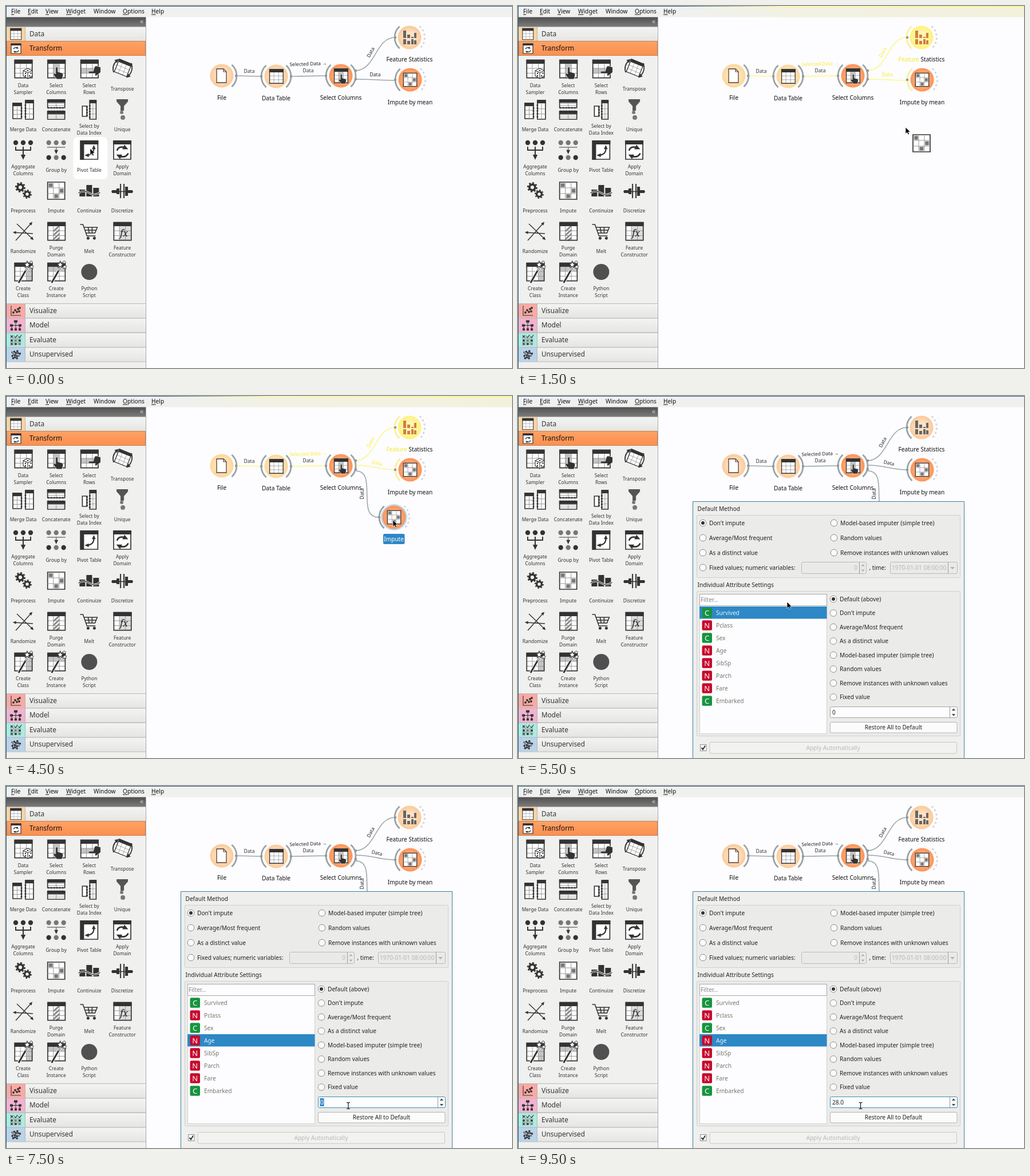
An HTML page that plays this animation: 884x633 px, repeating every 10000 ms.

```html
<!DOCTYPE html>
<html lang="en">
<head>
<meta charset="utf-8">
<title>Imputing a value</title>
<style>
html, body { margin: 0; width: 100%; height: 100%; overflow: hidden; background: #fdfcfe; }
svg { display: block; --link: #9ba8a8; --lab: #222; --peach: #fde3c6; --rim: #fbc896; --bar: #666; --arc: #98a3a6; --name: #111; --cream: #fde3c6; --creamrim: #fcca98; }
svg.warm { --link: #fcf88c; --lab: #f6ee30; --peach: #fff5b4; --rim: #fff27c; --bar: #d0803f; --arc: #f6f29c; --name: #f2ea30; --cream: #fdeabc; --creamrim: #fdd69a; }
text { font-family: "Noto Sans", "Open Sans", sans-serif; white-space: pre; }
.u { text-decoration: underline; }
.d { fill: #333; }
.g { fill: #777; }
.w { fill: #fff; }
.s { fill: none; stroke: #333; stroke-width: 1.7; }
.b { fill: #fff; stroke: #333; stroke-width: 1.7; }
.t { fill: none; stroke: #999; stroke-width: 1; }
.link { fill: none; stroke: #9ba8a8; stroke-width: 1.6; }
</style>
</head>
<body>
<svg id="stage" width="884" height="633" viewBox="0 0 884 633">
<defs>
<linearGradient id="bar" x2="0" y2="1"><stop stop-color="#f4f4f3"/><stop offset="1" stop-color="#e5e5e4"/></linearGradient>
<linearGradient id="hot" x2="0" y2="1"><stop stop-color="#ffa266"/><stop offset="1" stop-color="#fb8f4d"/></linearGradient>
<linearGradient id="dark" x2="0" y2="1"><stop stop-color="#505050"/><stop offset="1" stop-color="#7d7d7d"/></linearGradient>
<linearGradient id="glow"><stop stop-color="#fffbb0" stop-opacity="0"/><stop offset=".3" stop-color="#fffb9c"/><stop offset="1" stop-color="#fff96e"/></linearGradient>
<radialGradient id="peach"><stop offset=".4" stop-color="var(--peach)"/><stop offset="1" stop-color="var(--rim)"/></radialGradient>
<radialGradient id="cream"><stop offset=".4" stop-color="var(--cream)"/><stop offset="1" stop-color="var(--creamrim)"/></radialGradient>
<radialGradient id="orange"><stop offset=".35" stop-color="#ffb88f"/><stop offset="1" stop-color="#fd9254"/></radialGradient>
</defs>
</svg>
<script>
const stage = document.getElementById('stage');
const at = (x, y, body, more = '') => `<g transform="translate(${x} ${y}) ${more}">${body}</g>`;
const path = (cls, d, more = '') => `<path class="${cls}" d="${d}" ${more}/>`;
const dot = (x, y, r, cls = 'd') => `<circle class="${cls}" cx="${x}" cy="${y}" r="${r}"/>`;
const rect = (x, y, w, h, fill, more = '') =>
  `<rect x="${x}" y="${y}" width="${w}" height="${h}" fill="${fill}" ${more}/>`;
// y is the middle of the line of text
const text = (x, y, s, size = 10.14, fill = '#222', more = '') =>
  `<text x="${x}" y="${y + size * .36}" font-size="${size}" fill="${fill}" ${more}>${s}</text>`;
const mid = 'text-anchor="middle"';

/* ---------- icons, centred on 0,0 ---------- */
const table = (inner = '') => path('w', 'M-15-16H16V16H-15z') + inner +
  path('t', 'M-15-1H16M-15 7.5H16M-5-9V16M5.5-9V16') +
  path('s', 'M-14.7-15.5H15.7V15.7H-14.7z') + path('d', 'M-15.5-16.3H16.5V-9H-15.5z');
const hand = (x, y, turn = 0) =>
  at(x, y, path('d', 'M-4-9q2-3 4 0v7l7 2q3 1 2 5l-2 6h-9l-6-8q0-3 3-2l1 1z', 'stroke="#fff" stroke-width=".7"'), `rotate(${turn})`);
const head = (x, y, turn, k = 1) => at(x, y, path('d', 'M5 0L-4-4.2V4.2z'), `rotate(${turn}) scale(${k})`);
const grid = path('b', 'M-15-15H15V15H-15z') +
  path('t', 'M-5-15V15M5-15V15M-15-5H15M-15 5H15') +
  path('g', 'M-13-13H-6V-6H-13zM6-3.5H13V3.5H6zM-3.5 6H3.5V13H-3.5z', 'stroke="#bbb"');
const swap = path('s', 'M-8-1Q-6-8 3-6M9 3Q6 10-3 8', 'style="stroke-width:2.4"') + head(5, -5, 25, .9) + head(-5, 7, 205, .9);
const gear = (x, y, r) => at(x, y,
  `<circle class="s" r="${r}" style="stroke-width:${r * .75}"/>` +
  `<circle class="s" r="${r * 1.55}" pathLength="16" stroke-dasharray="1 1" style="stroke-width:${r * .5}"/>`);
const star = (x, y, k) => at(x, y, path('b', 'M0-6L1.7-2 6-1.6 2.8 1.3 3.8 5.6 0 3.3-3.8 5.6-2.8 1.3-6-1.6-1.7-2z', 'style="stroke-width:1.3"'), `scale(${k})`);
const wand = path('s', 'M-8 19L7-7', 'style="stroke:#fff;stroke-width:5"') +
  path('s', 'M-8 19L7-7', 'style="stroke-width:3"') + path('s', 'M4-2L7-7', 'style="stroke:#fff;stroke-width:1.4"') +
  star(7, -13, .95) + star(15, -9, .6) + star(14, -17, .5);
const sheet = (x, y, w, h) => path('b', `M${x} ${y}h${w}v${h}h${-w}z`) + path('d', `M${x - .8} ${y - .8}h${w + 1.6}v6h${-w - 1.6}z`) +
  path('t', `M${x + w / 2} ${y + 6}v${h - 7}M${x + 1} ${y + h * .45}h${w - 2}M${x + 1} ${y + h * .72}h${w - 2}`);
const dashes = d => path('s', d, 'stroke-dasharray="3 2" style="stroke-width:2.6"');
const trio = (y, ...cls) => cls.map((c, i) => dot(-13 + 13 * i, y, 4.2, c)).join('');
const bars = '<path fill="var(--bar)" d="M-11-12h5V1h-5zM-4-5h5v6h-5zM3-1h4v2h-4zM8-8h4v9h-4zM-11 3h5v9h-5zM-4 6h5v6h-5zM3 3h4v9h-4zM8 5h4v7h-4z"/>';
const page = path('b', 'M-9-12H3L8-7V12H-9z', 'style="stroke:#5a3a34;stroke-width:1.3"') + path('s', 'M3-12V-7H8', 'style="stroke:#5a3a34;stroke-width:1.2"');

const die = path('b', 'M8-1L16 3V12L8 17 0 12V3zM0 3L8 7 16 3M8 7V17', 'style="stroke-width:1.1"') +
  dot(8, 3, 1.3) + dot(4, 8, 1.2) + dot(4, 12, 1.2) + dot(11, 12, 1.2) + dot(13.5, 7.5, 1.2);
const column = path('', 'M-5-9H5V16H-5z', 'fill="#c4c4c4"');
const tools = [
  ['Data|Sampler', table() + die],
  ['Select|Columns', table(column) + hand(3, 7)],
  ['Select|Rows', table(path('', 'M-15-1H16V7H-15z', 'fill="#c4c4c4"')) + hand(9, 4, -90)],
  ['Transpose', at(1, -2, table(), 'rotate(22) scale(.76)') +
    path('s', 'M-15 6Q-19-6-9-15M16-10Q20 3 11 12', 'style="stroke-width:1.8"') + head(-9, -15, -40, .8) + head(10, 13, 140, .8)],
  ['Merge Data', sheet(-18, -11, 15, 27) + sheet(4, -16, 14, 33) + dashes('M-3-4V16M4-9V16')],
  ['Concatenate', sheet(-15, -17, 30, 14) + sheet(-15, 3, 30, 14) + dashes('M-15-3H15M-15 3H15')],
  ['Select by|Data Index', sheet(1, -16, 11, 33) + path('b', 'M-12-6H-4V12H-12z') + dashes('M-4-6V12M1-8V15')],
  ['Unique', path('', 'M-10-18H10V-14L3-6V2H-3V-6L-10-14z', 'fill="#555"') + dot(-1, 5, 3, 'g') + dot(1, 14, 4, 'g')],
  ['Aggregate|Columns', trio(-13, 'd', 'd', 'd') + path('s', 'M-13-6V0H13V-6M0-6V12', 'style="stroke-width:2"') + head(0, 12, 90)],
  ['Group by', trio(-13, 'g', 'g', 'g') + path('s', 'M-16-5H16M0-5V2', 'style="stroke:#777;stroke-width:1.5"') + head(0, 3, 90, .8) + trio(13, 'd', 'g', 'd')],
  ['Pivot Table', path('b', 'M-15-16H15V16H-15z') + path('d', 'M-16-17H16V-10H-16zM-16-10H-9V17H-16z') +
    path('s', 'M-4 9Q9 8 8-4', 'style="stroke-width:2.2"') + head(8, -5, -90, .8) + head(-4, 9, 180, .8)],
  ['Apply|Domain', path('b', 'M-15-16H15V16H-15z') + path('d', 'M-16-17H16V-10H-16z') + at(0, 2, swap, 'scale(1.15)')],
  ['Preprocess', gear(-5, -6, 5) + gear(7, 6, 4.4)],
  ['Impute', grid],
  ['Continuize', path('d', 'M-17-2H-7V10H-17zM-5-10H5V10H-5zM7-5H17V10H7z') +
    path('s', 'M-19 4Q-9-2 0 4T19 3', 'style="stroke:#fff;stroke-width:3"') + path('s', 'M-19 4Q-9-2 0 4T19 3', 'style="stroke-width:1.4"')],
  ['Discretize', path('d', 'M-18-1H-10V4H-18zM-10-4H-5V6H-10zM5-7H10V9H5zM10-1H18V4H10z') +
    path('s', 'M-3-12V13M3-12V13', 'style="stroke-width:2"') + path('s', 'M-19 1.5H19')],
  ['Randomize', path('s', 'M-13 16L13-13M-11-13L16 13M17 4L-16 2', 'style="stroke-width:1.4"') +
    head(14, -14, -48, .65) + head(16, 13, 43, .65) + head(-15, 2, 183, .65)],
  ['Purge|Domain', table(path('w', 'M-5-9H6V16H-5z') + path('s', 'M-5 0L5-9M-5 7L6-3M-5 14L6 4M0 16L6 11', 'style="stroke:#888;stroke-width:3"'))],
  ['Melt', path('s', 'M-16-12H-11L-4 8H11M-9-7H14L10 3H-6M-7-2H12M-2-7L0 3M5-7V3', 'style="stroke-width:1.6"') + dot(-2, 12, 2.5) + dot(9, 12, 2.5)],
  ['Feature|Constructor', table(path('', 'M-5-9H16V16H-5z', 'fill="#ddd"')) +
    `<text x="3" y="9" font-size="16" ${mid} fill="#222" style="font-family:'Noto Serif',serif;font-style:italic">fx</text>`],
  ['Create|Class', table(path('', 'M6-9H16V16H6z', 'fill="#c4c4c4"')) + wand],
  ['Create|Instance', table(path('', 'M-15-9H16V-1H-15z', 'fill="#c4c4c4"')) + wand],
  ['Python|Script', '<circle r="14" fill="#505050"/>'],
];
const cellX = i => 30 + 57.7 * (i % 4);
const cellY = i => 110 + 71 * Math.floor(i / 4);

/* ---------- side panel ---------- */
function tool([label, icon], i) {
  const x = cellX(i), y = cellY(i), lines = label.split('|');
  return at(x, y, icon) + lines.map((s, k) =>
    text(x, y + (lines.length > 1 ? 28.5 + 12 * k : 34.5), s, 8.45, '#333', mid)).join('');
}
function section(y, label, tint, icon) {
  return rect(1, y, 243, 25, 'url(#bar)') + rect(1, y, 32, 25, tint) +
    path('', `M1 ${y + .5}H244M1 ${y + 25.5}H244M33.5 ${y}V${y + 25}`, 'stroke="#b6b6b6"') +
    at(17, y + 13, icon) + text(41, y + 12.7, label, 11.75, '#333');
}
const scatter = path('s', 'M-8-9V8H9', 'style="stroke-width:1.1"') +
  [[-4, 3], [-1, -1], [2, 2], [4, -3], [7, -5], [6, 1]].map(p => dot(...p, 1.9)).join('');
const tree = path('s', 'M0-6V0M-7 5V0H7V5M0 0V5', 'style="stroke-width:1"') +
  path('d', 'M-3-9H3V-5H-3zM-10-2H-5V2H-10zM5-2H10V2H5zM-9 5H-5V9H-9zM-2 5H2V9H-2zM5 5H9V9H5z');
const score = path('s', 'M-9-8l4 4m0-4l-4 4M-2-6l2 2 3-5M5-6l2 2 3-5M-9 5l4 4m0-4l-4 4', 'style="stroke-width:1.2"') +
  path('t', 'M-10-2H10M-10 4H10M-3-9V9M4-9V9') + dot(-7, 1, 2) + dot(0, 1, 2, 'g') + dot(7, 1, 2) + dot(0, 7, 2) + dot(7, 7, 2, 'g');
const cluster = [...Array(15)].map((_, i) => {
  const r = 2.1 * Math.sqrt(i), a = i * 2.4;
  return dot((r * Math.cos(a)).toFixed(1), (r * Math.sin(a)).toFixed(1), 1.8, i % 4 ? 'd' : 'g');
}).join('');

const menus = [[9, 'File', 1], [38, 'Edit', 1], [69, 'View', 1], [105, 'Widget', 1], [153, 'Window', 0], [204, 'Options', 1], [254, 'Help', 1]]
  .map(([x, s, n]) => text(x, 9.8, n ? `<tspan class="u">${s[0]}</tspan>${s.slice(1)}` : s, 10.2, '#111')).join('');

const chrome = rect(0, 0, 884, 633, '#fdfcfe') + rect(0, 0, 884, 19.5, '#f0f0ef') +
  rect(0, 0, 884, 1, '#2a6288') +
  `<g id="glow-top">${rect(280, 1, 604, 18.5, 'url(#glow)', 'opacity=".14"')}${rect(280, 0, 604, 1.5, 'url(#glow)')}</g>` + menus +
  rect(1, 19.5, 243, 613.5, '#f0f0ef') + rect(1, 19.5, 243, 17, 'url(#dark)') + text(237, 26.5, '«', 13, '#ccc', mid) +
  section(36, 'Data', '#fbd3a2', at(0, 0, table(), 'scale(.62)')) +
  rect(1.5, 61.5, 242, 25, 'url(#hot)', 'stroke="#c58258"') +
  path('b', 'M9 66H26V83H9z', 'style="stroke-width:1.2"') + path('d', 'M8.5 65.5H26.5V69H8.5z') + at(17.5, 76, swap, 'scale(.52)') +
  text(41, 74, 'Transform', 11.75, '#111') +
  '<rect id="hover" width="60" height="74" rx="8" fill="#fff"/>' + tools.map(tool).join('') +
  section(520, 'Visualize', '#f9aaa4', scatter) + section(545.5, 'Model', '#f3b2cf', tree) +
  section(571, 'Evaluate', '#abebdf', score) + section(596.5, 'Unsupervised', '#b9d3ea', cluster) +
  rect(0, 0, 1, 633, '#2a6288') + rect(244, 19.5, 1, 613.5, '#a9a9a9');

/* ---------- workflow ---------- */
function arc(side, r, more) {
  const x = side * r * .67, y = r * .74;
  return `<path d="M${x} ${-y}A${r} ${r} 0 0 ${side > 0 ? 1 : 0} ${x} ${y}" fill="none" stroke-width="2.8" ${more}/>`;
}
function node(x, y, fill, icon, label, ports, tone = '#98a3a6', dy = 38.5) {
  const solid = `stroke="${tone}"`;
  return at(x, y,
    (ports[0] === '1' ? arc(-1, 26, solid) : '') +
    (ports[1] === '1' ? arc(1, 26, solid) : arc(1, 26.5, 'stroke="#d3d7da" stroke-dasharray="3.5 4"')) +
    `<circle r="20.5" fill="url(#${fill})"/>` + icon + text(0, dy, label, 10.14, '#111', mid));
}
const small = s => at(0, 0, s, 'scale(.78)');
const label = (x, y, turn, s = 'Data', fill = 'var(--lab)') =>
  at(x, y, text(0, 0, s, 8.5, fill, mid), `rotate(${turn})`);
const wire = (d, more = '') => path('link', d, more);
const warm = 'style="stroke:var(--link)"';
const port = (x, y) => `<circle cx="${x}" cy="${y}" r="2.2" fill="#8d989b"/>`;

const flow = wire('M402 122L446 123', warm) + wire('M498 123L559 122', warm) + wire('M611 113C646 112 645 55 680 55', warm) +
  `<g id="flat">${wire('M611 128C634 128 657 130 680 130', warm)}${label(645, 120, 0)}</g>` +
  `<g id="bent">${wire('M611 121C642 121 650 129 680 129', warm)}${label(648, 117, 12)}</g>` +
  `<path id="cord" class="link"/>` +
  label(425, 113.5, 0, 'Data', '#333') + label(528, 101, -2, 'Selected Data →') + label(528, 113, 0, 'Data', '#333') + label(637, 81, -62) +
  node(377, 122, 'cream', page, 'File', '01') +
  node(472, 123, 'cream', small(table()), 'Data Table', '11') +
  node(585, 122, 'orange', small(table(column) + hand(3, 7)), 'Select Columns', '11', '#98a3a6', 38) +
  node(705, 55, 'peach', bars, '<tspan fill="var(--name)">Feature</tspan> Statistics', '1.', 'var(--arc)') +
  node(706, 129, 'orange', small(grid), 'Impute by mean', '1.', 'var(--arc)', 39) +
  [[402, 122], [446, 123], [498, 123], [559, 122], [611, 113], [611, 128], [680, 55], [680, 129]].map(p => port(...p)).join('') +
  '<g id="added"><circle id="halo" cx="678" cy="212" r="23" fill="#bcdcf3"/>' +
  node(678, 212, 'orange', small(grid), '', '1.') + port(652, 212) +
  '<rect id="chip" x="659" y="241" width="37.5" height="18" rx="2.5" fill="#2f86c6"/>' +
  text(677.5, 250, 'Impute', 10.14, '#111', mid + ' id="name"') + '</g>' +
  `<g id="cord-label">${label(621.5, 171, -90, 'Data', '#222')}</g>`;

/* ---------- dialog ---------- */
const edge = c => `stroke="${c}" rx="2"`;
function radio(x, y, s, on) {
  return `<circle cx="${x}" cy="${y}" r="5.8" fill="#fbfbfb" stroke="#8d9091"/>` +
    (on ? dot(x, y, 3) : '') + text(x + 11, y, s);
}
function arrows(x, y, fill) {
  return at(x, y, `<path fill="${fill}" d="M-3.2-3L0-6.4 3.2-3zM-3.2 3L0 6.4 3.2 3z"/>`);
}
const methods = ["Don't impute", 'Average/Most frequent', 'As a distinct value', 'Model-based imputer (simple tree)', 'Random values', 'Remove instances with unknown values'];
const fields = [['Survived', 1], ['Pclass'], ['Sex', 1], ['Age'], ['SibSp'], ['Parch'], ['Fare'], ['Embarked', 1]];
const field = ([s, cat], i) => {
  const y = 379 + 22 * i;
  return rect(321.5, y - 8.7, 17.5, 17.5, cat ? '#16943f' : '#c70a2c', 'rx="2.5"') +
    text(330.2, y, cat ? 'C' : 'N', 13, '#fff', mid) + text(346, y, s, 10.14, '#77786f', 'class="field"');
};
const dialog = '<g id="dialog">' + rect(305, 184, 475, 460, '#efefee') +
  path('', 'M305.5 633V184.5H779.5V633', 'fill="none" stroke="#3d7f9f"') +
  text(313.5, 197.5, 'Default Method') + rect(312.5, 208.5, 460, 109, '#ebebea', edge('#cfcfce')) +
  methods.map((s, i) => radio(i < 3 ? 323 : 552, 222 + 26 * (i % 3), s, !i)).join('') +
  radio(323, 300, 'Fixed values; numeric variables:') +
  rect(495.5, 290.5, 113, 20, '#eaeae9', edge('#b9b9b8')) + path('t', 'M596.5 291V310') + arrows(602.5, 300.5, '#b0b0b0') +
  text(593, 300.5, '0', 10.14, '#b8b8b8', 'text-anchor="end"') + text(613.5, 300, ', time:') +
  rect(650.5, 290.5, 117, 20, '#eaeae9', edge('#b9b9b8')) + text(653, 300.5, '1970-01-01 08:00:00', 10.14, '#b8b8b8') +
  path('t', 'M751.5 291V310') + path('', 'M755 299H763L759 303z', 'fill="#b0b0b0"') +
  text(313.5, 330.5, 'Individual Attribute Settings') + rect(312.5, 341.5, 460, 253, '#ebebea', edge('#cfcfce')) +
  rect(317.5, 366.5, 222, 224, '#fdfcfe', 'stroke="#d0d0cf"') + rect(317.5, 346.5, 222, 20, '#fdfcfe', 'stroke="#a9a9a9"') +
  text(319, 356, 'Filter...', 10.14, '#888') + '<rect id="row" x="317" width="222.5" height="21.5" fill="#2d88c5"/>' +
  fields.map(field).join('') +
  ['Default (above)', ...methods, 'Fixed value'].map((s, i) => radio(551, 355 + 24.5 * i, s, !i)).join('') +
  rect(545.5, 543.5, 222, 19, '#fdfcfe', edge('#a3a3a3') + ' id="spin"') + path('t', 'M754.5 544V562') + arrows(761, 553, '#444') +
  '<rect id="pick" x="548.5" y="546" width="7" height="14" fill="#2d88c5"/>' + text(549, 553, '', 10.14, '#222', 'id="value"') +
  '<rect id="caret" y="546" width="1" height="14" fill="#111"/>' +
  rect(545.5, 570.5, 221.5, 18.5, '#fbfbfb', edge('#b3b3b3')) + text(656, 579.5, 'Restore All to Default', 10.14, '#222', mid) +
  rect(318.5, 609.5, 10.5, 11, '#fdfdfd', 'stroke="#8d9091"') + path('s', 'M320.5 615L323 618 327 611.5', 'style="stroke-width:2"') +
  rect(335, 605.5, 431.5, 19.5, '#f2f2f1', edge('#c6c6c5')) + text(550.5, 615, 'Apply Automatically', 10.14, '#b9b9b9', mid) + '</g>';

const pointers = `<g id="drag">${grid}</g>` +
  '<path id="arrow" d="M0 0V11.5L2.7 9 4.6 13 6.6 12.1 4.8 8.2H8.4z" fill="#000" stroke="#fff" stroke-width=".7"/>' +
  '<path id="beam" d="M-3-5.5H-1L0-4.5 1-5.5H3M0-4.5V4.5M-3 5.5H-1L0 4.5 1 5.5H3" fill="none" stroke="#111" stroke-width="1.2"/>';

stage.insertAdjacentHTML('beforeend', chrome + flow + dialog + pointers);

/* ---------- timeline: one row per half second ---------- */
const cord = (x, y) => `M611 131C650 131 ${x - 40} ${y} ${x} ${y}`;
const steps = [
  { x: 147, y: 249, hover: 10 },
  { x: 88, y: 324, hover: 13, warm: 1 },
  { x: 402, y: 268, drag: 1, hover: -1 },
  { x: 677, y: 212 },
  { x: 677, y: 212, drag: 0, added: 1 },
  { x: 612, y: 131 },
  { x: 653.5, y: 210, cord: cord(651, 212) },
  { x: 653.5, y: 210, linked: 1 },
  { x: 672, y: 215 },
  { x: 676, y: 217, chosen: 1 },
  { dialog: 1, warm: 0, row: 0, value: '0' },
  { x: 470, y: 360 },
  { x: 377, y: 443, row: 3 },
  { x: 610, y: 527 },
  { x: 598, y: 559, beam: 1 },
  { focus: 1, pick: 1 },
  { pick: 0, value: '28', caret: 1 },
  { value: '28.' },
  { x: 598.5, value: '28.0' },
  { caret: 0 },
];
const states = [];
steps.forEach((s, i) => states.push({ ...states[i - 1], ...s }));

const el = id => document.getElementById(id);
const show = (id, on) => { el(id).style.display = on ? '' : 'none'; };
const set = (id, name, v) => el(id).setAttribute(name, v);
const move = (id, x, y) => set(id, 'transform', `translate(${x} ${y})`);

function draw(s) {
  stage.classList.toggle('warm', !!s.warm);
  show('glow-top', s.warm);
  show('hover', s.hover >= 0);
  if (s.hover >= 0) { set('hover', 'x', cellX(s.hover) - 28); set('hover', 'y', cellY(s.hover) - 23); }
  show('drag', s.drag); move('drag', s.x + 28, s.y + 28);
  show('arrow', !s.beam); move('arrow', s.x, s.y);
  show('beam', s.beam); move('beam', s.x, s.y);
  show('flat', !s.linked); show('bent', s.linked); show('cord-label', s.linked);
  show('cord', s.cord); if (s.cord) set('cord', 'd', s.cord);
  show('added', s.added); show('halo', s.chosen); show('chip', s.chosen);
  set('name', 'fill', s.chosen ? '#fff' : '#111');
  show('dialog', s.dialog);
  if (!s.dialog) return;
  set('row', 'y', 368 + 22 * s.row);
  document.querySelectorAll('.field').forEach((f, i) => f.setAttribute('fill', i === s.row ? '#e8f3fb' : '#77786f'));
  set('spin', 'stroke', s.focus ? '#3c8fb8' : '#a3a3a3');
  show('pick', s.pick); show('caret', s.caret);
  el('value').textContent = s.value;
  set('value', 'fill', s.pick ? '#fff' : '#222');
  if (s.caret) set('caret', 'x', 549.5 + el('value').getComputedTextLength());
}

const start = performance.now();
let last = -1;
function tick() {
  const i = Math.floor(Math.max(0, performance.now() - start) % 10000 / 500);
  if (i !== last) draw(states[last = i]);
  requestAnimationFrame(tick);
}
tick();
</script>
</body>
</html>
```
